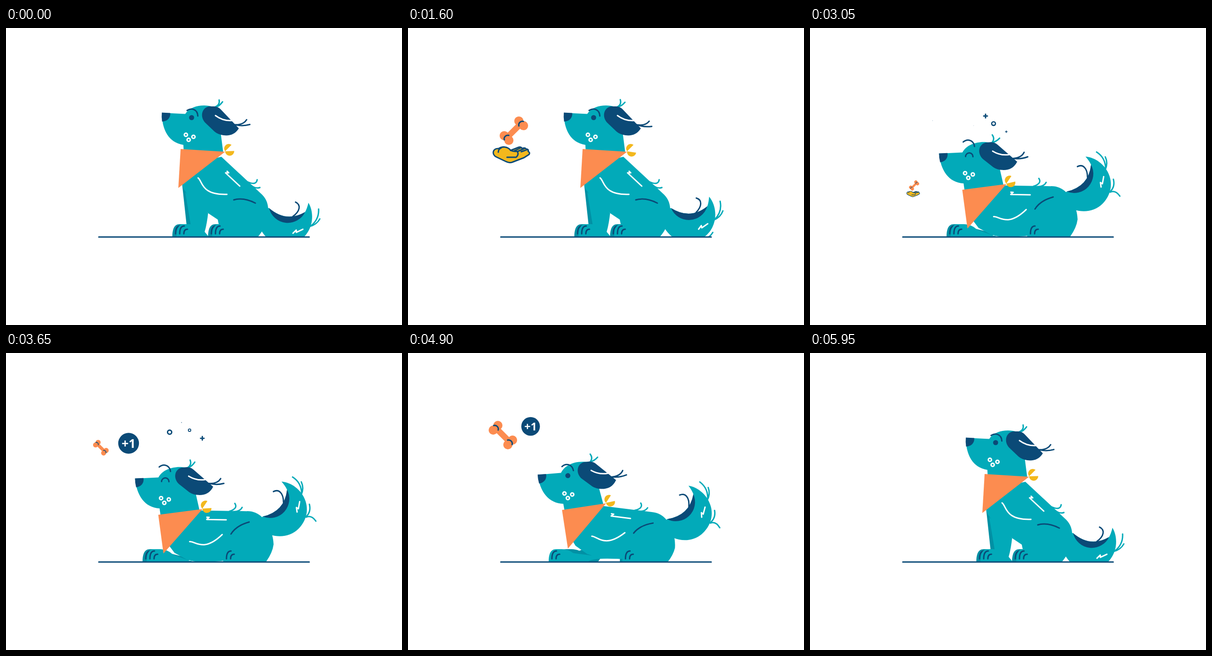
An HTML page for the animation above (6000 ms loop, 864 by 648 pixels).

```html
<!DOCTYPE html>
<html lang="en">
<head>
<meta charset="utf-8">
<title>Good dog</title>
<style>
  html, body { margin: 0; width: 100%; height: 100%; overflow: hidden; background: #fff; }
  svg { display: block; width: 864px; height: 648px; }
  .teal { fill: #02aab9; }
  .dark { fill: #0190a4; }
  .navy { fill: #0b4a77; }
  .orange { fill: #fc8c50; }
  .yellow { fill: #f3b81d; }
  .line { fill: none; stroke: #0b4a77; stroke-width: 3; stroke-linecap: round; stroke-linejoin: round; }
  .white { stroke: #fff; }
  .fur { stroke: #02aab9; }
  text { font: 700 24px "Open Sans", "Noto Sans", sans-serif; fill: #fff; text-anchor: middle; }
</style>
</head>
<body>
<svg viewBox="0 0 864 648">
  <defs>
    <clipPath id="above"><rect width="864" height="456"/></clipPath>
    <path id="pad" d="M0 0C0 -16 4 -27 16 -27H28C40 -27 52 -22 60 -12L70 0Z"/>
    <path id="toes" class="line" d="M7 -6C7 -15 9 -23 17 -23M16 -6C16 -12 18 -16 24 -16"/>
    <g id="bone">
      <g class="orange">
        <rect x="-23" y="-6.5" width="46" height="13"/>
        <circle cx="-22.6" cy="-7.2" r="10"/><circle cx="-22.6" cy="7.2" r="10"/>
        <circle cx="22.6" cy="-7.2" r="10"/><circle cx="22.6" cy="7.2" r="10"/>
      </g>
      <path class="line" d="M-29 -.5A8 8 0 0 1 -15 -.5M15 .5A8 8 0 0 1 29 .5"/>
    </g>
  </defs>

  <g clip-path="url(#above)">
    <g class="torso">
      <g id="tail">
        <path class="teal" d="M0 0Q42 26 79 -4Q82 -12 83 -25C96 -10 102 18 90 42C78 66 55 74 36 74C14 74 -6 60 -16 40V0Z"/>
        <path class="navy" d="M0 0Q42 26 79 -4A42 42 0 0 1 0 0Z"/>
        <path class="line" d="M55 -22C68 -18 68 -4 54 10"/>
        <path class="line fur" d="M107 -15Q112 8 95 25M113 6Q108 20 93 26M91 53Q82 68 66 67M75 89Q78 72 66 68"/>
        <path class="line white" d="M60 46L66 38L67 43L80 34"/>
      </g>
    </g>
    <g id="hindFar"><use href="#pad" class="dark"/><use href="#toes"/></g>
    <path id="legFar" class="dark"/>
    <g id="pawFar"><use href="#pad" class="dark"/><use href="#toes"/></g>
    <path class="torso teal" d="M470 281L556 361Q571 374 572 394C571 425 561 442 551 454Q537 466 514 471L470 456L462 418L441 404L405 376L388 352L378 323L380 300Z"/>
    <path id="legNear" class="teal"/>
    <g id="pawNear"><use href="#pad" class="teal"/><use href="#toes"/></g>
    <g id="hindNear"><use href="#pad" class="teal"/><use href="#toes"/></g>
  </g>

  <g class="torso">
    <path class="line fur" d="M528 336Q546 344 548 331M532 341Q544 352 554 348"/>
    <path class="line white" d="M482.500 312.500L486 316L479 316L510 345M419 327C429 334 425 365 482 363"/>
    <path class="line" d="M497 375Q518 369 544 382"/>
    <g id="head">
      <path id="furA" class="line fur" d="M457 172Q467 168 465 157"/>
      <path id="furB" class="line fur" d="M459 172Q466 170 472.500 161"/>
      <path class="teal" d="M340 185L391 187.500C400 174 416 169 432 169C445 169 458 173 464 178L469 233L474 272L388 275L387 255C355 250 340 222 340 185Z"/>
      <path class="navy" d="M340 184.500L358.500 185.500C359 198 350 204 340.500 204Q339 194 340 184.500Z"/>
      <path class="navy" d="M444 171H455Q463 172 468 177L508 219C500 232 488 236 474 234Q462 232 455 226L434 206C422 192 428 173 444 171Z"/>
      <path class="line white" d="M457 191Q473 203 492 202"/>
      <path id="earFur" class="line" d="M498 211Q518 212 525 200M500 211Q516 215 532 210.500"/>
      <path id="brow" class="line" d="M395 180C405 173 418 178 418.500 192"/>
      <circle id="eyeOpen" class="navy" cx="405" cy="195.500" r="5.500"/>
      <path id="eyeShut" class="line" d="M397 197A8 8 0 0 1 413 199"/>
      <g class="line white">
        <circle cx="392.500" cy="233" r="3.500"/><circle cx="409" cy="237.500" r="3.500"/><circle cx="398.500" cy="244" r="3.500"/>
      </g>
    </g>
    <g id="scarf">
      <path class="orange" d="M381 264L478 270L376 349Z"/>
      <path class="yellow" d="M478 269A10 10 0 0 1 492 255Z"/>
      <path id="knot" class="yellow" d="M478 269A10 10 0 0 0 498 269Z"/>
    </g>
  </g>

  <path id="swish" class="line" d="M520 268Q534 250 551 240" pathLength="1"/>
  <path class="line" d="M202.500 456H661.500"/>

  <g id="treat">
    <use href="#bone" transform="translate(6 -52) rotate(-45)"/>
    <path class="line" style="fill:#f3b81d" d="M-27 -13C-20 -18 -8 -18 -1 -9L17 -16Q22 -17 24 -13Q30 -16 33 -12Q39 -11 37 -7Q42 -4 39 0L28 7L2 17Q-5 19 -12 15L-33 5C-43 -1 -40 -14 -27 -13Z"/>
    <path class="line" d="M-28 -5Q-28 -12 -22 -14M-1 -9Q4 -6 13 -7Q18 -1 11 6H-9M7 -8L20 -14M15 -7L29 -13M22 -6L36 -11"/>
  </g>
  <g id="prize"><use href="#bone" transform="rotate(45)"/></g>
  <g id="badge"><circle class="navy" r="20.300"/><text y="8.500">+1</text></g>
  <g id="sparks"></g>
</svg>
<script>
const LOOP = 6000, STEP = 50, GROUND = 456;
const HIP = [520, 393], TURN = -42;
const el = Object.fromEntries([...document.querySelectorAll('[id]')].map(n => [n.id, n]));
const torsoParts = document.querySelectorAll('.torso');

const mix = (a, b, u) => a + (b - a) * u;
const smooth = u => (1 - Math.cos(Math.PI * u)) / 2;
const wave = (t, period) => smooth(2 * t / period);
// Eased 0 to 1 between two times.
const ramp = (t, from, to) => smooth(Math.min(1, Math.max(0, (t - from) / (to - from))));
// 0 to 1 and back to 0.
const trip = (t, out, arrive, back, home) => ramp(t, out, arrive) - ramp(t, back, home);
// Scale that pops in past its full size, settles, then shrinks away.
const pop = (t, from, peak, settle, leave, gone, over) =>
  over * ramp(t, from, peak) - (over - 1) * ramp(t, peak, settle) - ramp(t, leave, gone);

const place = (n, x, y, a = 0, s = 1) =>
  n.setAttribute('transform', `translate(${x} ${y}) rotate(${a}) scale(${s})`);
const spin = (n, a, x, y) => n.setAttribute('transform', `rotate(${a} ${x} ${y})`);
const show = (n, on) => n.setAttribute('visibility', on ? 'visible' : 'hidden');

// down: 0 sitting, 1 lying. The torso turns on the hip, head and tail turn on the torso.
function drawDog(t) {
  const down = trip(t, 1950, 2350, 4750, 5350);
  const bend = Math.sin(Math.PI * down);
  const dx = 3.5 * bend, dy = 2.5 * bend, turn = TURN * down;

  for (const n of torsoParts)
    n.setAttribute('transform', `translate(${dx} ${dy}) rotate(${turn} ${HIP})`);
  const onTorso = (x, y) => {
    const a = turn * Math.PI / 180, u = x - HIP[0], v = y - HIP[1];
    return [HIP[0] + dx + u * Math.cos(a) - v * Math.sin(a),
            HIP[1] + dy + u * Math.sin(a) + v * Math.cos(a)];
  };

  const wagging = t > 700 && t < 1900 || t > 5300 && t < 5900;
  const wag = wagging ? -9 * wave(t - 100, 600) : 0;
  place(el.tail, 574, 393, 9 - 12 * down - 8 * bend + wag);
  spin(el.head, 36.5 * down - 6.7 * bend, 442, 290);
  spin(el.scarf, 31 * down - 6 * bend, 441.5, 298);

  // Feet step one after the other; legs span from the torso to the paws.
  const near = mix(372, 307, trip(t, 2180, 2450, 4900, 5250) && trip(t, 2180, 2450, 4900, 5250));
  const far = mix(363, 298, trip(t, 1950, 2150, 4750, 5060));
  place(el.pawNear, near, 455);
  place(el.pawFar, far, 455);
  place(el.hindNear, 450 + 24 * down ** 2, 455);
  place(el.hindFar, 441 + 40 * down ** 4, 455);
  const leg = (n, paw, front, back) => {
    const heel = paw + 56 + 40 * down ** 2;
    n.setAttribute('d', `M${front}L${paw + 31 + 16 * bend} ${430 + 10 * bend}L${paw + 22} ${GROUND}
      H${heel}Q${heel + 8} ${GROUND - 10} ${back}Z`);
  };
  leg(el.legNear, near, onTorso(391, 358), onTorso(441, 404));
  leg(el.legFar, far, onTorso(384, 338), onTorso(405, 376));

  place(el.brow, 0, -15 * down ** 6);
  show(el.eyeOpen, down < 0.95);
  show(el.eyeShut, down >= 0.95);

  const flap = wave(t, 1000), spread = wave(t, 2000);
  spin(el.knot, -2 + 12 * flap, 478, 269);
  spin(el.earFur, 8 * flap, 499, 211);
  spin(el.furA, -20 * spread, 458, 172);
  spin(el.furB, 14 * spread, 460, 172);

  const tip = ramp(t, 2000, 2150), end = ramp(t, 2150, 2350);
  show(el.swish, tip > end);
  el.swish.setAttribute('stroke-dasharray', `0 ${end} ${tip - end} 2`);
}

const sparks = [[383, 216], [400.5, 225], [428.3, 235], [357, 214]].map(([x, y], i) => {
  const n = document.createElementNS('http://www.w3.org/2000/svg', 'path');
  n.setAttribute('class', 'line');
  n.setAttribute('d', i % 2 ? 'M-4.500 0A4.500 4.500 0 1 1 4.500 0A4.500 4.500 0 1 1 -4.500 0' : 'M-4 0H4M0 -4V4');
  el.sparks.append(n);
  return { n, x, y, born: 2690 + 115 * i };
});

function drawExtras(t) {
  place(el.treat, 225, mix(276, 362, ramp(t, 1930, 2310)), 0,
    t < 2850 ? pop(t, 100, 350, 550, 2850, 3160, 1.1) : Math.max(0, (3160 - t) / 310));
  place(el.prize, 207, 211 - 0.022 * (t - 3450), 0, pop(t, 3450, 3850, 4050, 5550, 5970, 1.1));
  place(el.badge, 267.5, 202 - 5 * ramp(t, 3050, 3650) - 0.0295 * Math.max(0, t - 3650), 0,
    pop(t, 3010, 3450, 3900, 5450, 5800, 1.2));

  for (const { n, x, y, born } of sparks) {
    const age = t - born, on = age > 0 && age < 1000;
    show(n, on);
    if (on) place(n, x, y - 0.067 * age, 0, Math.min(1, 1.3 * Math.sin(Math.PI * age / 1000)));
  }
}

const start = performance.now();
function frame() {
  const t = Math.floor((performance.now() - start) % LOOP / STEP) * STEP;
  drawDog(t);
  drawExtras(t);
  requestAnimationFrame(frame);
}
frame();
</script>
</body>
</html>
```
